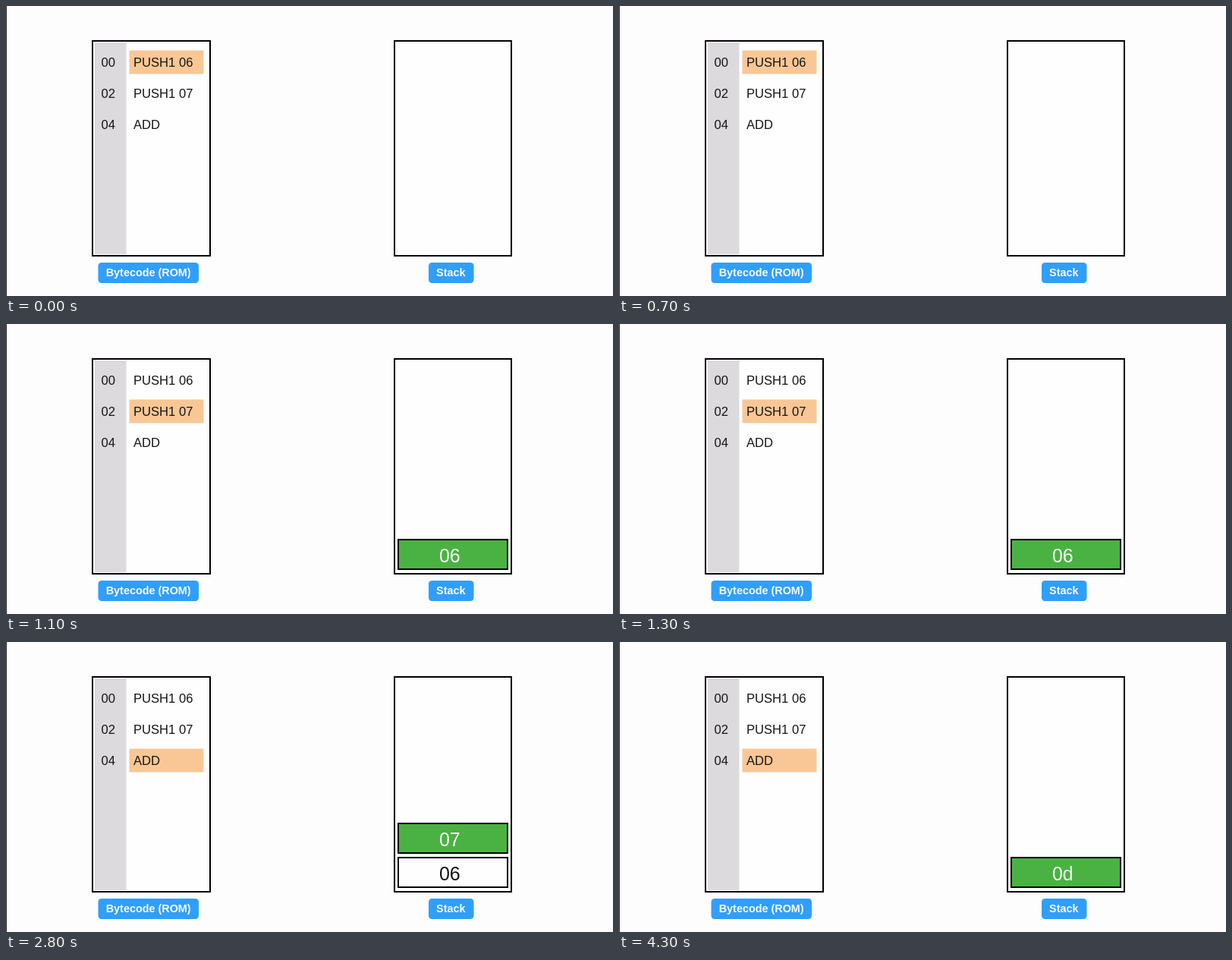
An HTML page for the animation above (6600 ms loop, 800x382 px).

```html
<!DOCTYPE html>
<html lang="en">
<head>
<meta charset="utf-8">
<title>Stack machine addition</title>
<style>
  html, body { margin: 0; width: 100%; height: 100%; overflow: hidden; background: #fefdfe; }
  svg { display: block; width: 100%; height: 100%; }
  text { font: 16.6px "Liberation Sans", Arial, sans-serif; fill: #151515; }
  .box { fill: #fefefe; stroke: #000; stroke-width: 2; }
  .tag { fill: #309ffc; }
  .tag-text { font-size: 14.4px; font-weight: bold; fill: #f6faff; text-anchor: middle; }
  .cell { fill: #fefefe; stroke: #000; stroke-width: 2; }
  .value { font-size: 25px; text-anchor: middle; }
  .top .cell { fill: #4ab243; }
  .top .value { fill: #f4faf3; }
</style>
</head>
<body>
<svg viewBox="0 0 800 382">
  <rect width="800" height="382" fill="#fefdfe"/>
  <rect width="1" height="382" fill="#2a2a2a"/>

  <rect class="box" x="114" y="46" width="155" height="283"/>
  <rect x="117" y="48" width="41.5" height="279" fill="#dcdadc"/>
  <rect id="highlight" x="162.5" y="58.5" width="98" height="31" fill="#f9c795"/>
  <g id="program"></g>
  <rect class="tag" x="121.5" y="338" width="132.5" height="27" rx="4.5"/>
  <text class="tag-text" x="187.7" y="355.5">Bytecode (ROM)</text>

  <rect class="box" x="512" y="46" width="154" height="283"/>
  <g id="stack"></g>
  <rect class="tag" x="557" y="338" width="59.5" height="27" rx="4.5"/>
  <text class="tag-text" x="586.3" y="355.5">Stack</text>
</svg>
<script>
  const LOOP = 6600, ROW_HEIGHT = 41, CELL_HEIGHT = 45;
  const program = [["00", "PUSH1 06"], ["02", "PUSH1 07"], ["04", "ADD"]];

  // Stack values are listed from bottom to top.
  const steps = [
    { start: 0, row: 0, stack: [] },
    { start: 1100, row: 1, stack: ["06"] },
    { start: 2800, row: 2, stack: ["06", "07"] },
    { start: 4200, row: 2, stack: ["0d"] }
  ];

  const byId = id => document.getElementById(id);

  byId("program").innerHTML = program.map(([address, code], i) => {
    const y = 80 + i * ROW_HEIGHT;
    return `<text x="125.5" y="${y}">${address}</text><text x="168" y="${y}">${code}</text>`;
  }).join("");

  function show({ row, stack }) {
    byId("highlight").setAttribute("y", 58.5 + row * ROW_HEIGHT);
    byId("stack").innerHTML = stack.map((value, i) => `
      <g class="${i === stack.length - 1 ? "top" : ""}" transform="translate(0 ${-i * CELL_HEIGHT})">
        <rect class="cell" x="517" y="284" width="144" height="39"/>
        <text class="value" x="584.8" y="313.5">${value}</text>
      </g>`).join("");
  }

  let current;
  function frame() {
    const time = performance.now() % LOOP;
    const step = steps.findLast(s => s.start <= time);
    if (step !== current) show(current = step);
    requestAnimationFrame(frame);
  }
  frame();
</script>
</body>
</html>
```
